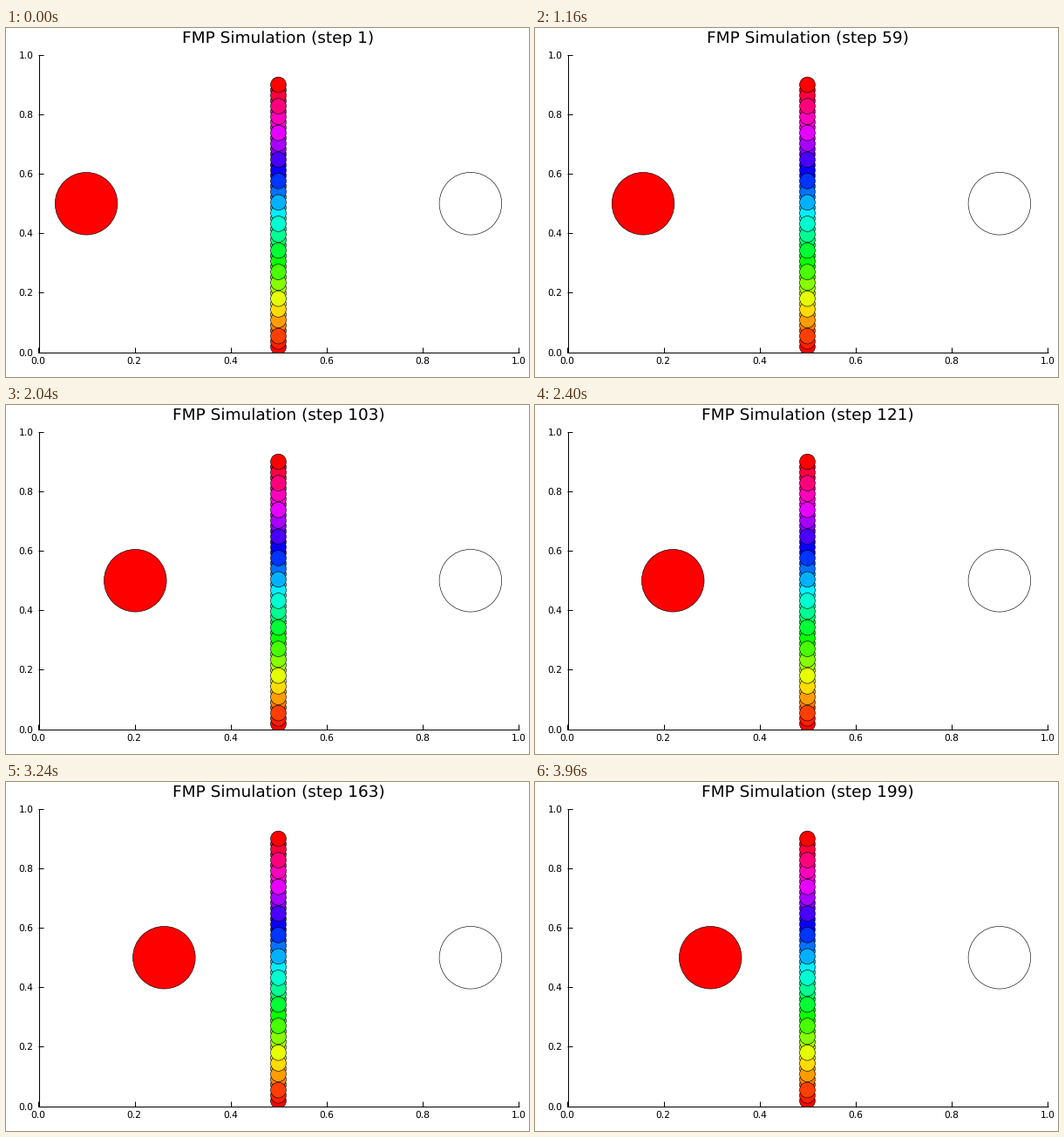
These frames come from a looping animation (600 px wide and 400 px high, 4 s). A matplotlib script:

```python
import colorsys

import matplotlib.pyplot as plt
from matplotlib.animation import FuncAnimation
from matplotlib.patches import Circle, Rectangle

plt.rcParams.update({
    "font.family": "DejaVu Sans",
    "text.hinting": "none",
    "toolbar": "None",
})

W, H, DPI = 600, 400, 100
LEFT, RIGHT, TOP, BOTTOM = 37, 588, 31, 371.5
FRAMES, INTERVAL = 100, 40
COUNT = 50
BIG, SMALL = 35.8, 8.9

fig = plt.figure(figsize=(W / DPI, H / DPI), dpi=DPI, facecolor="white")
ax = fig.add_axes([0, 0, 1, 1])
ax.set_xlim(0, W)
ax.set_ylim(H, 0)
ax.axis("off")


def pt(px):
    return px * 72 / DPI


def to_x(v):
    return LEFT + v * (RIGHT - LEFT)


def to_y(v):
    return BOTTOM + v * (TOP - BOTTOM)


def line(x, y):
    ax.plot(x, y, color="black", lw=pt(1), solid_capstyle="butt", zorder=1)


def label(x, y, text, size, ha="center"):
    return ax.text(x, y, text, fontsize=pt(size), ha=ha, va="baseline")


clip = Rectangle((LEFT, TOP), RIGHT - LEFT, BOTTOM - TOP,
                 transform=ax.transData)


def disc(x, y, r, color, z):
    c = Circle((to_x(x), to_y(y)), r, fc=color, ec="black",
               lw=pt(0.6), zorder=z)
    ax.add_patch(c)
    c.set_clip_path(clip)
    return c


# Axes with inward ticks
line([LEFT + 0.5] * 2, [TOP, BOTTOM + 0.5])
line([LEFT, RIGHT + 0.5], [BOTTOM] * 2)
for k in range(6):
    v = k / 5
    x, y = to_x(v), to_y(v)
    line([x + 0.4] * 2, [BOTTOM, BOTTOM - 5.5])
    line([LEFT, LEFT + 6], [y] * 2)
    label(x, 385, f"{v:.1f}", 10.6)
    label(31.6, y + 3.9, f"{v:.1f}", 10.6, ha="right")

# Stacking of the column: a few discs lie on top, some just below them
top = [3, 8, 10, 15, 19, 24, 28, 32, 36, 41, 46, 50]
middle = [6, 13, 17, 22, 26, 30, 34, 39, 44, 48]


def layer(i):
    return 2 + (i in middle) + 2 * (i in top)


for i in sorted(range(1, COUNT + 1), key=layer):
    hue = (i - 1) / (COUNT - 1)
    disc(0.5, 0.9 * i / COUNT, SMALL, colorsys.hsv_to_rgb(hue, 1, 1), layer(i))

disc(0.9, 0.5, BIG, "white", 6)
mover = disc(0.1, 0.5, BIG, "red", 6)
title = label((LEFT + RIGHT) / 2, 17.4, "", 18.5)


def update(n):
    step = 1 + 2 * n
    mover.center = to_x(0.1 + 0.001 * (step - 1)), to_y(0.5)
    title.set_text(f"FMP Simulation (step {step})")
    return mover, title


anim = FuncAnimation(fig, update, frames=FRAMES, interval=INTERVAL,
                     repeat=True, repeat_delay=0, blit=False)
plt.show()
```
